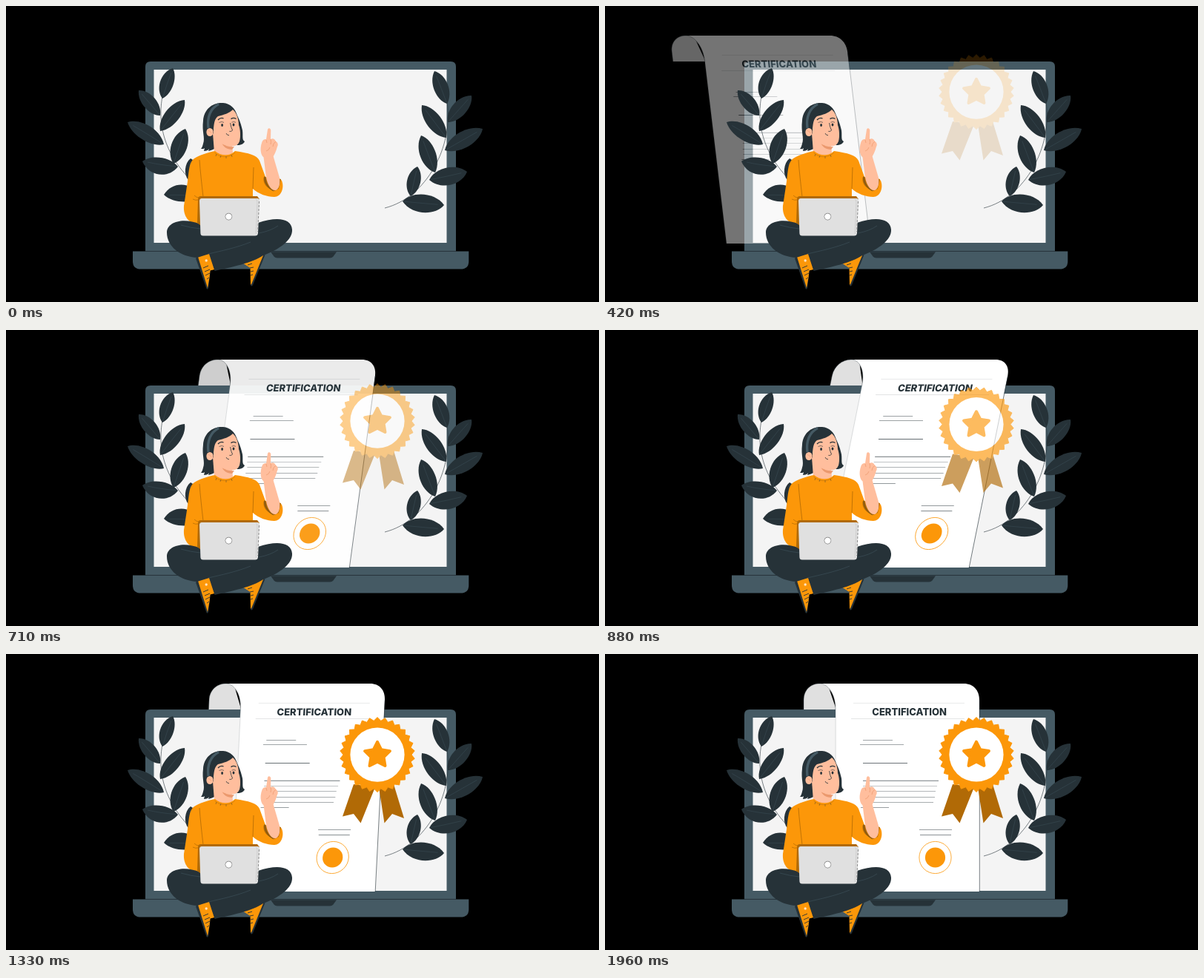
An HTML page with a canvas for the animation above (2000 ms loop, 800 by 400 pixels).

```html
<!DOCTYPE html>
<html lang="en">
<head>
<meta charset="utf-8">
<title>Certification</title>
<style>
  html, body { margin: 0; width: 100%; height: 100%; overflow: hidden; background: #000; }
  canvas { display: block; }
</style>
</head>
<body>
<canvas id="stage" width="800" height="400"></canvas>
<script>
const W = 800, H = 400, LOOP = 2000, STEPS = 48;
const DARK = '#263238', SLATE = '#455a64', ORANGE = '#fc9709', BROWN = '#b16a06';
const SKIN = '#ffbe9d', SHADE = '#eb996e', GREY = '#e0e0e0', PALE = '#f4f4f4';

const stage = document.getElementById('stage').getContext('2d');
const layerCanvas = document.createElement('canvas');
layerCanvas.width = W;
layerCanvas.height = H;
const layer = layerCanvas.getContext('2d');

function fill(c, d, color) {
  c.fillStyle = color;
  c.fill(new Path2D(d));
}

function line(c, d, color = DARK, width = 0.6) {
  c.strokeStyle = color;
  c.lineWidth = width;
  c.stroke(new Path2D(d));
}

function disc(c, x, y, r, color) {
  c.fillStyle = color;
  c.beginPath();
  c.arc(x, y, r, 0, Math.PI * 2);
  c.fill();
}

function oval(c, x, y, rx, ry, color) {
  c.fillStyle = color;
  c.beginPath();
  c.ellipse(x, y, rx, ry, 0, 0, Math.PI * 2);
  c.fill();
}

// Easing with a slight overshoot: cubic-bezier(.36, -.01, .5, 1.38)
function ease(x) {
  if (x <= 0) return 0;
  if (x >= 1) return 1;
  const curve = (s, a, b) => 3 * (1 - s) ** 2 * s * a + 3 * (1 - s) * s * s * b + s ** 3;
  let lo = 0, hi = 1;
  for (let i = 0; i < 30; i++) {
    const mid = (lo + hi) / 2;
    if (curve(mid, 0.36, 0.5) < x) lo = mid; else hi = mid;
  }
  return curve(lo, -0.01, 1.38);
}

const mix = (a, b, p) => a + (b - a) * p;
const clamp01 = v => Math.max(0, Math.min(1, v));

// Slide in from the left, leaning back, forward and upright
function paperPose(t) {
  const lean = [20, -10, 2, 0].map(a => Math.tan(a * Math.PI / 180));
  const x = t / LOOP;
  if (x < 0.6) {
    const p = ease(x / 0.6);
    return { dx: mix(-300, 0, p), skew: mix(lean[0], lean[1], p), alpha: clamp01(p) };
  }
  const i = x < 0.8 ? 1 : 2;
  const p = ease((x - (i === 1 ? 0.6 : 0.8)) / 0.2);
  return { dx: 0, skew: mix(lean[i], lean[i + 1], p), alpha: 1 };
}

function withLayer(alpha, matrix, draw) {
  if (alpha <= 0) return;
  layer.setTransform(1, 0, 0, 1, 0, 0);
  layer.clearRect(0, 0, W, H);
  layer.setTransform(...matrix);
  draw(layer);
  stage.globalAlpha = alpha;
  stage.drawImage(layerCanvas, 0, 0);
  stage.globalAlpha = 1;
}

function drawScreen(c) {
  fill(c, 'M188 332V82Q188 75 195 75H600Q607 75 607 82V332Z', SLATE);
  fill(c, 'M199.5 86H594.5V320H199.5Z', PALE);
  fill(c, 'M171 331.5H624.3V345Q624.3 355.6 613 355.6H182Q171 355.6 171 345Z', SLATE);
  line(c, 'M188 331.4H607', DARK, 1);
  fill(c, 'M357 332.3H446L441.5 338.5Q440 340.5 437 340.5H366Q363 340.5 361.5 338.5Z', DARK);
}

// Text rules: x from, x to, y, strength
const RULES = [
  [335, 485, 66.4, 0.13], [332, 485, 87.5, 0.16],
  [348, 388, 116.5, 0.55], [344, 403, 122.5, 0.55], [348, 408, 147.5, 0.85],
  [348, 450, 171.3, 0.8], [348, 448, 178.5, 0.35], [349, 446, 185.5, 0.45],
  [348, 445, 193.5, 0.5], [348, 443, 200.5, 0.5], [345, 383, 207.5, 0.6],
  [424, 468, 237.5, 0.6], [425, 467, 244.6, 0.7]
];

function drawPaper(c) {
  fill(c, 'M268 75V62C268 48 278 40 289 40H300L312 75Z', GREY);
  fill(c, 'M287 40H484C497 40 505 49 505 62V321H311V75C311 54 301 40 287 40Z', '#fff');
  line(c, 'M268 75V62C268 48 278 40 289 40C301 40 311 54 311 75', DARK, 0.4);
  line(c, 'M311.2 75V321', 'rgba(38,50,56,.4)', 0.4);
  line(c, 'M505.3 62V321', DARK, 0.6);
  for (const [a, b, y, k] of RULES) line(c, `M${a} ${y}H${b}`, `rgba(38,50,56,${k})`, 0.8);
  c.fillStyle = DARK;
  c.font = '800 13px Inter, "Open Sans", sans-serif';
  c.textAlign = 'center';
  c.textBaseline = 'alphabetic';
  c.fillText('CERTIFICATION', 410.6, 83.2);
  disc(c, 445.5, 275, 13.6, ORANGE);
  c.beginPath();
  c.arc(445.5, 275, 21.6, 0, Math.PI * 2);
  c.strokeStyle = ORANGE;
  c.lineWidth = 0.8;
  c.stroke();
}

// Leaf: base, tip, swell on the left and on the right of its axis
const LEAVES = [
  [211, 125, 225, 84, 13, 10], [208, 148, 179, 114, 11, 12],
  [208, 169, 241, 127, 13, 12], [213, 187, 164, 157, 12, 14],
  [226, 213, 242, 166, 14, 13], [232, 217, 184, 210, 18, 11],
  [246, 235, 249, 206, 7, 14], [262, 258, 213, 255, 10, 19],
  [595, 132, 578, 88, 12, 13], [596, 157, 628, 121, 13, 12],
  [594, 178, 561, 134, 13, 13], [592, 195, 643, 166, 14, 14],
  [579, 225, 560, 175, 14, 13], [571, 235, 622, 224, 14, 16],
  [546, 257, 555, 217, 12, 11], [535, 264, 591, 269, 15, 16]
];

function drawLeaf(c, [x, y, tx, ty, left, right]) {
  const len = Math.hypot(tx - x, ty - y);
  c.save();
  c.translate(x, y);
  c.rotate(Math.atan2(ty - y, tx - x));
  fill(c, `M0 0C${len * 0.2} ${-left} ${len * 0.75} ${-left * 1.1} ${len} 0` +
          `C${len * 0.8} ${right} ${len * 0.25} ${right * 1.1} 0 0Z`, DARK);
  line(c, `M2 0Q${len * 0.5} ${(right - left) * 0.2} ${len * 0.85} 0`, SLATE, 0.35);
  c.restore();
}

function drawBranches(c) {
  line(c, 'M211 122C205 155 209 202 262 247', DARK, 0.6);
  line(c, 'M595 130C604 190 567 259 511 273', DARK, 0.6);
  for (const leaf of LEAVES) drawLeaf(c, leaf);
}

function polygon(c, x, y, points, outer, inner) {
  c.beginPath();
  for (let i = 0; i < points * 2; i++) {
    const a = -Math.PI / 2 + i * Math.PI / points;
    const r = i % 2 ? inner : outer;
    c.lineTo(x + r * Math.cos(a), y + r * Math.sin(a));
  }
  c.closePath();
}

function drawBadge(c) {
  const x = 501, y = 136;
  c.lineJoin = 'round';
  fill(c, 'M469 176L454 219.5L469 216L478.5 228.5L498 180Z', BROWN);
  fill(c, 'M503 180L510.5 228.5L521 216L537 222L523 176Z', BROWN);
  c.fillStyle = c.strokeStyle = ORANGE;
  polygon(c, x, y, 30, 50.5, 46);
  c.fill();
  c.lineWidth = 1;
  c.stroke();
  disc(c, x, y, 36.6, '#fff');
  c.fillStyle = c.strokeStyle = ORANGE;
  polygon(c, x, y + 0.5, 5, 17.8, 9);
  c.fill();
  c.lineWidth = 4;
  c.stroke();
}

function drawHead(c) {
  fill(c, 'M293 131C278 130 267 140 266 155C264 170 269 178 266 186C265 190 264 192 263 193' +
          'C266 193 267 193 268 192L267 196C270 196 273 195 274 193L273 196C278 195 282 193 284 190' +
          'L302 182L312 188C317 188 321 186 322 183C318 181 320 176 319 168C317 159 315 154 312 148' +
          'C309 138 303 132 293 131Z', DARK);
  line(c, 'M287 132.5C276 138 271 150 273 165', SLATE, 3.4);
  fill(c, 'M279 172L281 198C286 203 301 203 306 198L305 188Z', SKIN);
  fill(c, 'M291 185C297 190 303 191 308 190L305 194C298 194 293 190 291 185Z', SHADE);
  fill(c, 'M280 165C281 158 281 153 286 149C294 147 301 145 306 140C311 144 314 153 314 161' +
          'C316 166 317 176 315 183C313 188 309 190 304 189C294 189 283 184 280 174Z', SKIN);
  oval(c, 275, 170.5, 4.6, 5.6, SKIN);
  line(c, 'M272.8 168.5Q276 168.5 277 172', SHADE, 0.6);
  line(c, 'M286 154Q289 150.5 293.5 151.8M303.5 152.6Q307 150.2 310.5 152.5', DARK, 1.3);
  oval(c, 291.6, 161, 1.4, 2, DARK);
  oval(c, 307, 160.5, 1.4, 2, DARK);
  line(c, 'M287.5 157.5Q291 155.5 294 157.4M304.5 157.2Q307.5 155.6 310 157.4', DARK, 0.6);
  line(c, 'M302.6 158Q303.4 164 305.6 168Q304 170 301.4 169.4M297 172Q298 174.7 301 174.8', DARK, 0.8);
}

function drawSweater(c) {
  fill(c, 'M282 196C272 198 260 202 254 206C247 211 247 221 245 237L240 270C239 284 246 294 262 297' +
          'H333V247C341 254 352 258 362 258C371 258 376 246 372 236L366 230L350 231L342 209' +
          'C338 201 328 199 309 196C302 203 290 203 282 196Z', ORANGE);
  line(c, 'M261 208C262 223 264 240 266 258M334 218L333 247', BROWN, 0.8);
  line(c, 'M281.5 198C289 206 302 205 309 198', BROWN, 0.5);
  line(c, 'M284 200L283 203M290 202L289 205M297 203V206M304 201L305 204', DARK, 0.4);
  line(c, 'M252 261Q256 263 259 262M254 256Q257 259 260 259', BROWN, 0.7);
}

function drawHand(c) {
  fill(c, 'M348 231C346 236 349 246 362 250L368 247L371 234Z', BROWN);
  fill(c, 'M347 200L351 232C353 242 358 250 364 249C369 247 370 239 369 232L360 201Z', SKIN);
  fill(c, 'M351 180L353 167C353.5 164.5 357 164.5 357.3 168L357 180C360 178 363 180 364 183' +
          'C367 184 367.5 188 366 190C364 197 362 202 359 205C354 207 349 206 346 203' +
          'C343 198 343 191 345 185C346 181 348 180 351 180Z', SKIN);
  line(c, 'M357 180Q358 184 357 187M364 183Q360 186 360 190M351 196Q355 195 356 191M351 181L352 185', SHADE, 0.7);
  line(c, 'M349 230C349 239 354 247 361 250', DARK, 0.5);
}

function drawShoes(c) {
  fill(c, 'M259 338L256 341L270.5 382Q272 384 273 381L276 356Z', DARK);
  fill(c, 'M259 339L274 333L281.5 356L275.5 357.5L274.5 367L272 381Z', ORANGE);
  line(c, 'M266 354L273 351M268 359L275 356M269 364L275 361M271 369L274 367', DARK, 0.9);
  disc(c, 270.2, 344, 1.7, '#ffe4c0');
  fill(c, 'M344 335L349.5 336.5L333 377Q331 380 330 377L336 355Z', DARK);
  fill(c, 'M319 347L344 335L347 337L331.5 375L330 377L329.5 354Z', ORANGE);
  line(c, 'M326 350L332 348M329 354L334 353M330 359L334 358M330 364L333 363', DARK, 0.9);
}

function drawLegs(c) {
  fill(c, 'M262 295C239 285 217 292 217 306C217 325 235 339 258 340L274 335L281.5 358' +
          'C304 353 333 347 347 337C369 329 387 316 386 302C385 287 366 284 340 293Z', DARK);
  line(c, 'M273 335C290 331 310 327 330 319M236 296Q250 300 262 301M341 307Q357 304 367 297', SLATE, 0.5);
}

function drawNotebook(c) {
  fill(c, 'M258 293L259 261Q259 257 263 257H339L342 261L263 264V297Z', BROWN);
  fill(c, 'M264 260H339Q342.5 260 342.2 264L340 307Q339.8 310.5 336 310.5H266Q262.5 310.5 262.4 307' +
          'L261 263.5Q261 260 264 260Z', GREY);
  c.setLineDash([3, 2]);
  line(c, 'M341.5 264L339.7 305', '#777', 0.8);
  c.setLineDash([]);
  line(c, 'M337 261Q339 262 339 265L337.2 308', '#c2c2c2', 0.6);
  disc(c, 300.4, 284.6, 4.8, '#777');
  disc(c, 300.4, 284.6, 4.2, '#fff');
}

function drawPerson(c) {
  drawHead(c);
  drawSweater(c);
  drawHand(c);
  drawShoes(c);
  drawLegs(c);
  drawNotebook(c);
}

function render(ms) {
  // The picture advances 24 times a second
  const step = Math.min(STEPS - 1, Math.floor((ms % LOOP + 5) * STEPS / LOOP));
  const t = Math.min(LOOP, step * LOOP / (STEPS - 1) + 9);

  stage.fillStyle = '#000';
  stage.fillRect(0, 0, W, H);
  drawScreen(stage);

  const { dx, skew, alpha } = paperPose(t);
  withLayer(alpha, [1, 0, skew, 1, dx - skew * 180.5, 0], drawPaper);
  drawBranches(stage);

  const drop = ease(t / LOOP);
  withLayer(clamp01(drop), [1, 0, 0, 1, 0, -24 * (1 - drop)], drawBadge);
  drawPerson(stage);
}

const start = performance.now();
function tick() {
  render(performance.now() - start);
  requestAnimationFrame(tick);
}
tick();
</script>
</body>
</html>
```
